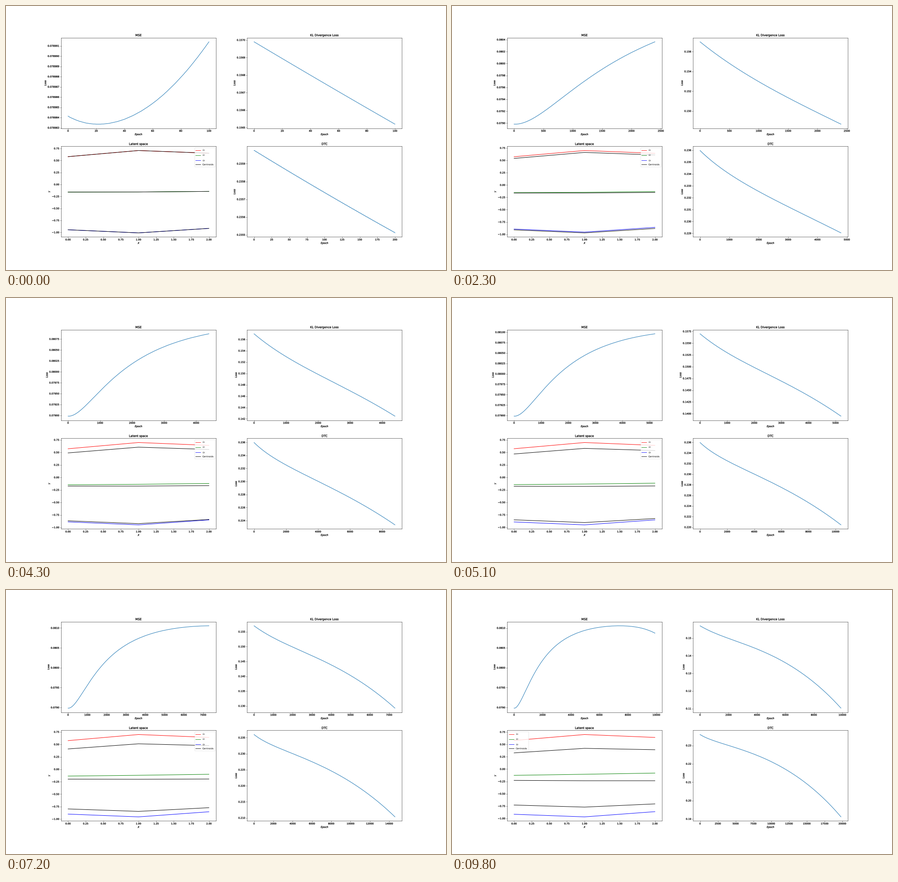
A matplotlib script that plays this animation: 966 px wide and 580 px high, repeating every 9.9 s.

```python
import matplotlib.pyplot as plt
import numpy as np
from matplotlib.animation import FuncAnimation
from matplotlib.patheffects import Stroke

W, H, DPI = 966, 580, 38.64
FRAMES, INTERVAL = 99, 100
STEP = 100          # epochs added per frame
LEGEND_SWAP = 80    # the legend jumps left from here on

plt.rcParams.update({
    "font.family": "DejaVu Sans",
    "text.hinting": "none",
    "axes.linewidth": 1.0,
    "xtick.major.width": 1.0,
    "ytick.major.width": 1.0,
    "lines.linewidth": 1.8,
})
HEAVY = [Stroke(linewidth=0.5, foreground="black")]


def kl_curve(s):
    """Fast start, slower middle, steeper end; s in thousands of epochs."""
    rate = 2.63 + 2.17 * np.exp(-s / 2.2) + .01676 * s ** 2.1
    return .15699 - 1e-3 * s * rate


def mse_curve(s):
    """Damped parabola around an early minimum, sagging at the end."""
    u = s - .021
    rise = 1390 * u ** 2 / (1 + .93 * u + .40 * u ** 2 + .0165 * u ** 3)
    start = .17 * np.exp(-s / .008)
    sag = 215 * (s / 10) ** 9
    y = .07898334 + 1e-6 * (rise + start - sag)
    grain = 2.0 ** -26    # rounding of single precision
    return np.round(y / grain) * grain


epochs = np.arange(FRAMES * STEP + 1)
mse = mse_curve(epochs / 1000)
kl = kl_curve(epochs / 1000)
dtc = np.repeat(mse + kl, 2)

# Centroids start on their latent curves and drift away
TOP, MIDDLE, BOTTOM = np.array([[.580, .708, .652],
                                [-.159, -.157, -.145],
                                [-.945, -1.010, -.916]])
# Colour, start, end, power of the easing, height of the early bump
TRACKS = [
    ("red", TOP, [.579, .700, .641], 1, -.013),
    ("green", MIDDLE, [-.127, -.105, -.081], 1.2, 0),
    ("blue", BOTTOM, [-.915, -.968, -.862], 1, .085),
    ("black", TOP, [.328, .420, .392], 1.25, 0),
    ("black", MIDDLE, [-.229, -.236, -.236], 1.9, 0),
    ("black", BOTTOM, [-.728, -.770, -.705], 1.25, 0),
]


def track_at(t, start, end, power, bump):
    lift = bump * (1 - t) * (1 - np.exp(-t / .2))
    return start + (np.array(end) - start) * t ** power + lift


# The tiny surplus keeps the pixel size from being rounded down
fig, axes = plt.subplots(2, 2, dpi=DPI,
                         figsize=((W + 1e-6) / DPI, (H + 1e-6) / DPI))
fig.subplots_adjust(left=.125, right=.9, bottom=.125, top=.88,
                    wspace=.2, hspace=.2)
(ax_mse, ax_kl), (ax_lat, ax_dtc) = axes


def dress(ax, title, xlabel, ylabel):
    ax.ticklabel_format(useOffset=False)
    texts = [ax.set_title(title),
             ax.set_xlabel(xlabel, style="italic", labelpad=5),
             ax.set_ylabel(ylabel, style="italic")]
    for axis in (ax.xaxis, ax.yaxis):
        texts += [tick.label1 for tick in axis.get_major_ticks(14)]
    for text in texts:
        text.set_path_effects(HEAVY)


dress(ax_mse, "MSE", "Epoch", "Loss")
dress(ax_kl, "KL Divergence Loss", "Epoch", "Loss")
dress(ax_lat, "Latent space", "X", "Y")
dress(ax_dtc, "DTC", "Epoch", "Loss")

# Each loss: axes, values, samples per epoch, line
losses = [(ax, data, rate, ax.plot([], [], color="#1f77b4")[0])
          for ax, data, rate in ((ax_mse, mse, 1), (ax_kl, kl, 1),
                                 (ax_dtc, dtc, 2))]

curves = [ax_lat.plot([0, 1, 2], start, color=color)[0]
          for color, start, *_ in TRACKS]
legend = ax_lat.legend(curves[:4], ["$L_1$", "$L_2$", "$L_3$", "Centroids"],
                       loc="upper right", borderaxespad=.4)
for handle in legend.get_lines():
    handle.set_linewidth(1.5)


def rescale(ax):
    ax.relim()
    ax.autoscale_view()


def update(i):
    for ax, data, rate, line in losses:
        count = rate * STEP * (i + 1) + 1
        line.set_data(np.arange(count), data[:count])
        rescale(ax)

    t = i / (FRAMES - 1)
    for curve, (_, *track) in zip(curves, TRACKS):
        curve.set_ydata(track_at(t, *track))
    rescale(ax_lat)
    legend.set_loc("upper left" if i >= LEGEND_SWAP else "upper right")
    return []


anim = FuncAnimation(fig, update, frames=FRAMES, interval=INTERVAL,
                     init_func=lambda: update(0), repeat=True)
plt.show()
```
